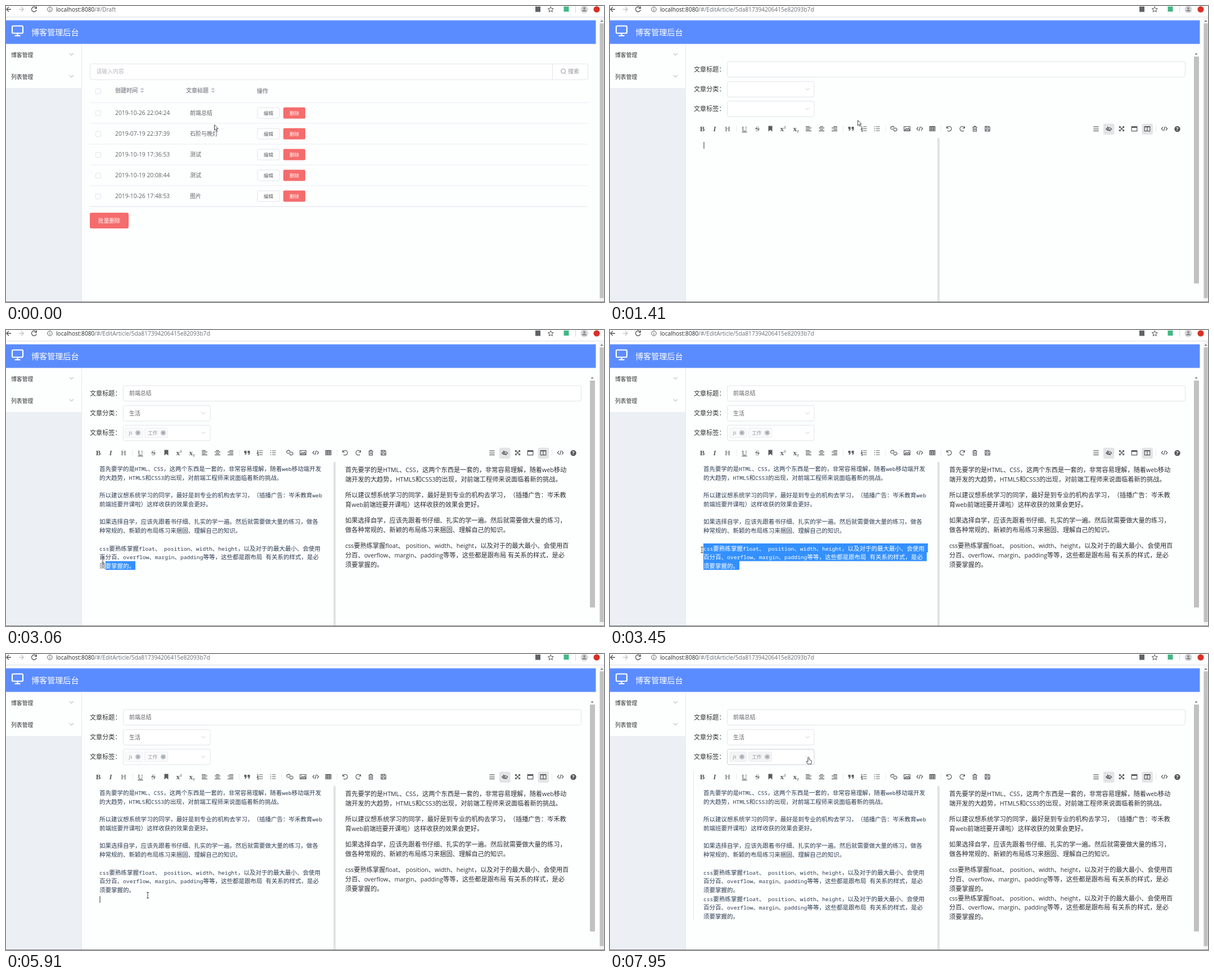
An HTML page for the animation above (8 s loop, 1063x527 px).

```html
<!DOCTYPE html>
<html lang="zh-CN">
<head>
<meta charset="utf-8">
<title>博客管理后台</title>
<style>
html, body { margin: 0; width: 100%; height: 100%; overflow: hidden; background: #fdfefe; }
svg { display: block; width: 100vw; height: 100vh; }
text { font-family: "Open Sans", "Noto Sans CJK SC", "Noto Sans CJK", sans-serif; white-space: pre; text-spacing-trim: space-all; }
.mono { font-family: "Noto Sans Mono", "Noto Sans CJK SC", "Noto Sans CJK", monospace; }
.bold { font-weight: 700; }
.serif { font-family: "Liberation Serif", serif; font-size: 13px; fill: #595b5f; text-anchor: middle; }
.line { fill: none; stroke: #595b5f; stroke-width: 1.2; }
.solid { fill: #595b5f; }
</style>
</head>
<body>
<script>
const LOOP = 8000;
const $ = id => document.getElementById(id);
const INK = '#606266', SOFT = '#909399', EDGE = '#e1e4ea', RED = '#f56c6c';

const rect = (x, y, w, h, fill, stroke = 'none', r = 0, more = '') =>
  `<rect x="${x}" y="${y}" width="${w}" height="${h}" rx="${r}" fill="${fill}" stroke="${stroke}" ${more}/>`;
const box = (x, y, w, h, more) => rect(x + .5, y + .5, w, h, '#fff', EDGE, 3, more);
const path = (d, stroke = INK, width = 1, fill = 'none') =>
  `<path d="${d}" stroke="${stroke}" stroke-width="${width}" fill="${fill}"/>`;
const circle = (x, y, r, fill, stroke = 'none') =>
  `<circle cx="${x}" cy="${y}" r="${r}" fill="${fill}" stroke="${stroke}"/>`;
const group = (id, body) => `<g id="${id}">${body}</g>`;

// Text centred on y; Latin runs get their own size beside the Chinese glyphs.
const LATIN = { mono: .917, prose: .945 };
const text = (x, y, size, str, fill = INK, cls = '', more = '') =>
  `<text x="${x}" y="${y + .37 * size}" font-size="${size}" fill="${fill}" class="${cls}" ${more}>` +
  str.replace(/[ -~]+/g, s => `<tspan font-size="${size * (LATIN[cls] || 1.03)}">${s}</tspan>`) + '</text>';
const chevron = (x, y, c) => path(`M${x - 3.5} ${y - 1.7}l3.5 3.4 3.5-3.4`, c, .9);

function chrome() {
  return rect(0, 0, 1063, 20, '#fff') + rect(0, 19, 1063, 1, '#dcdee0') +
    path('M9 6H.8M5 1.8L.8 6 5 10.2', '#4f5357', 1.3) +
    path('M23 6h8.2M27 1.8L31.2 6 27 10.2', '#c4c6c9', 1.3) +
    path('M53.4 3.2A4.4 4.4 0 1 0 54.2 7M54.3.8V4.3H50.8', '#4f5357', 1.3) +
    circle(78, 6, 4.2, 'none', '#55595d') + path('M78 5.4v3M78 3.4v1.1', '#55595d', 1.1) +
    `<text x="89" y="9.6" font-size="10.13" fill="#26292c">localhost:8080<tspan id="route" fill="#6b6f74"></tspan></text>` +
    rect(941, 1, 9, 9.5, '#5f6368') +
    path('M968.3 1.2l1.4 3.2 3.5.3-2.7 2.3.9 3.5-3.1-1.9-3.1 1.9.9-3.5-2.7-2.3 3.5-.3z', '#4f5357') +
    rect(991.5, 1, 9, 9, '#41b883') + rect(1012, 0, 1, 12, '#d8dadd') +
    circle(1028, 6, 6.6, '#d5d6d8') + circle(1028, 4, 2, '#85888c') +
    path('M1024 9.6q0-2.8 4-2.8t4 2.8z', 'none', 0, '#85888c') + circle(1050, 6, 5.6, '#d93025') +
    rect(0, 25.5, 1048.5, 42, '#5b8cff') +
    rect(11, 35.5, 19, 13, 'none', '#fff', 2, 'stroke-width="2.2"') + path('M20.5 49v4M15.5 53h10', '#fff', 2.2) +
    text(45, 46.5, 14.1, '博客管理后台', '#fff') +
    rect(0, 146, 134, 380, '#eceff4') + rect(134, 67.5, 1, 458.5, '#e6e7ea') +
    [['博客管理', 87], ['列表管理', 126]].map(([s, y]) => text(9, y, 9.85, s, '#303133') + chevron(116.3, y - 1, SOFT)).join('') +
    rect(1055, 21, 8, 505, '#f3f3f3') + rect(1055.5, 31, 7, 489, '#c1c1c1') + path('M1056.5 28h5l-2.5-3z', 'none', 0, '#777');
}

function draft() {
  const rows = [['2019-10-26 22:04:24', '前端总结'], ['2019-07-19 22:37:39', '石阶与晚灯'], ['2019-10-19 17:36:53', '测试'],
    ['2019-10-19 20:08:44', '测试'], ['2019-10-26 17:48:53', '图片']];
  const check = y => rect(159.5, y - 4.5, 9, 9, '#fff', EDGE, 1.5);
  const sort = x => path(`M${x - 3.5} 149h7l-3.5-3.8zM${x - 3.5} 151h7l-3.5 3.8z`, 'none', 0, '#c0c4cc');
  return box(149, 102.5, 885, 28) + rect(971, 103, 1, 27.5, EDGE) + text(160.5, 116.5, 9.85, '请输入内容', '#b4b7bf') +
    circle(990.5, 116, 3.9, 'none', SOFT) + path('M993.2 118.8l2.3 2.3', SOFT) + text(999, 116.5, 10, '搜索', SOFT) +
    check(152) + text(194, 150, 10, '创建时间', SOFT, 'bold') + sort(242) +
    text(320, 150, 10, '文章标题', SOFT, 'bold') + sort(368) + text(446, 151.5, 10, '操作', SOFT, 'bold') +
    rect(149, 172, 885, 37, '#f5f7fa', 'none', 0, 'id="rowHover"') + rect(149, 171.5, 885, 1, '#ebeef5') +
    rows.map(([date, title], i) => {
      const y = 190.5 + 37 * i, id = i ? '' : 'id="editBox"', label = i ? '' : 'id="editLabel"';
      return check(y + .5) + text(194, y, 10, date) + text(327, y, 10, title) +
        rect(447, y - 9.5, 39, 19, '#fff', EDGE, 2, id) + text(458, y, 8.5, '编辑', INK, '', label) +
        rect(493, y - 10, 39, 20, RED, 'none', 2) + text(504, y, 8.5, '删除', '#fff') +
        rect(149, y + 18, 885, 1, i < 4 ? '#ebeef5' : '#dfe2e8');
    }).join('') +
    rect(149, 368, 69, 28, RED, 'none', 3) + text(163.8, 382, 9.85, '批量删除', '#fff');
}

function toolbar() {
  const at = (x, cls, d) => `<path class="${cls}" transform="translate(${x} 218.5)" d="${d}"/>`;
  const letter = (x, s, more = '') => `<text class="serif" x="${x}" y="222.7" ${more}>${s}</text>`;
  const small = (x, dy) => letter(x, `x<tspan font-size="7" dy="${dy}">2</tspan>`, 'font-weight="700"');
  const bars = (...spans) => spans.map(([x, w], i) => `M${x} ${i * 2.6 - 3.9}h${w}`).join('');
  const code = 'M-2.5-3L-5.2 0-2.5 3M2.5-3L5.2 0 2.5 3M1-4L-1 4';
  const list = 'M-1.5-3.5h6.5M-1.5 0h6.5M-1.5 3.5h6.5';
  const undo = 'M-4.4-4.5v3.5h3.5M-4.2-1.2A4.2 4.2 0 1 1-3 3.2';
  const redo = 'M4.4-4.5v3.5H.9M4.2-1.2A4.2 4.2 0 1 0 3 3.2';
  const quote = 'M-5-3.5h4v4q0 3-3 3.2v-1.5q1.2-.2 1.2-1.7H-5zM1-3.5h4v4q0 3-3 3.2v-1.5q1.2-.2 1.2-1.7H1z';
  return letter(164, 'B', 'font-weight="700"') + letter(186, 'I', 'font-style="italic" font-weight="700"') + letter(209, 'H') +
    letter(239, 'U', 'text-decoration="underline"') + letter(262, 'S', 'text-decoration="line-through"') +
    at(285, 'solid', 'M-3.5-5h7V5L0 2-3.5 5z') + small(307.5, -4.5) + small(330.5, 2) +
    at(353, 'line', bars([-5, 7], [-5, 10], [-5, 7], [-5, 10])) +
    at(376, 'line', bars([-3, 6], [-5, 10], [-3, 6], [-5, 10])) +
    at(399, 'line', bars([-2, 7], [-5, 10], [-2, 7], [-5, 10])) +
    at(428.5, 'solid', quote) +
    at(451.5, 'line', list + 'M-4-5v3M-5-.8h2L-5 1.2h2M-5 2.5h2v2.5h-2') +
    at(474.5, 'line', list + 'M-5-3.5h2M-5 0h2M-5 3.5h2') +
    at(504.5, 'line', 'M-.2-.2L-2.2 1A2.2 2.2 0 0 1-4-3.6L-2-4.3Q.3-4 .4-1.6M.2.2L2.2-1A2.2 2.2 0 0 1 4 3.6L2 4.3Q-.3 4-.4 1.6') +
    at(528, 'line', 'M-5.3-4H5.3V4H-5.3zM-4 2.5l2.5-3 1.8 1.6L2.5-1.5 4.3 2.5zM-3-2.2h1') +
    at(550.5, 'line', code) +
    at(573, 'line', 'M-4.7-4H4.7V4H-4.7zM-4.7-3H4.7M-4.7-.6H4.7M-4.7 1.8H4.7M-1.6-4V4M1.6-4V4') +
    at(603, 'line', undo) + at(626, 'line', redo) +
    at(648.5, 'line', 'M-4-3H4M-1.3-3v-1.3h2.6V-3M-3-3V4.3H3V-3M-1-1v3.6M1-1v3.6') +
    at(671, 'line', 'M-4.2-4.2H2.6L4.2-2.6V4.2H-4.2zM-2.2-4v2.6h4V-4M-2.4 4V1h4.8v3') +
    [224.5, 414, 489.5, 588, 970].map(x => rect(x, 213, 1, 11, '#e9e9eb')).join('') +
    [877, 945.5].map(x => rect(x, 209.5, 19.5, 19.5, '#e3e4e5', 'none', 3)).join('') +
    at(864, 'line', 'M-4.7-3.3H4.7M-4.7.3H4.7M-4.7 3.9H4.7') +
    at(886.7, 'line', 'M-5 .5Q0-5 5 .5 0 6-5 .5zM-1.6-.5A1.8 1.8 0 0 0 .8 2.2M-2.6-3.6L2.6 4.4') +
    at(909.5, 'line', 'M-4-1.3V-4h2.7M4-1.3V-4H1.3M-4 1.3V4h2.7M4 1.3V4H1.3M-4-4L4 4M4-4L-4 4') +
    at(932, 'line', 'M-4.8-4H4.8V4.2H-4.8zM-4.8-3H4.8M-4.8-2.2H4.8') +
    at(955, 'line', 'M-4.8-4H4.8V4.2H-4.8zM-4.8-3.2H4.8M0-4V4') +
    at(985.5, 'line', code) + circle(1008.5, 219, 5.2, '#55575b') +
    '<text x="1008.5" y="222.4" font-size="9" font-weight="700" fill="#fff" text-anchor="middle">?</text>';
}

const CODE = ['首先要学的是HTML、CSS，这两个东西是一套的，非常容易理解，随着web移动端开发', '的大趋势，HTML5和CSS3的出现，对前端工程师来说面临着新的挑战。', '',
  '所以建议想系统学习的同学，最好是到专业的机构去学习，（插播广告：岑禾教育web', '前端班要开课啦）这样收获的效果会更好。', '',
  '如果选择自学，应该先跟着书仔细、扎实的学一遍。然后就需要做大量的练习，做各', '种常规的、新颖的布局练习来捆固、理解自己的知识。', ''];
const LAST = ['css要熟练掌握float、 position、width、height，以及对于的最大最小、会使用',
  '百分百、overflow、margin、padding等等，这些都是跟布局 有关系的样式，是必', '须要掌握的。'];
const PROSE = [['首先要学的是HTML、CSS，这两个东西是一套的，非常容易理解，随着web移动', '端开发的大趋势，HTML5和CSS3的出现，对前端工程师来说面临着新的挑战。'],
  ['所以建议想系统学习的同学，最好是到专业的机构去学习，（插播广告：岑禾教', '育web前端班要开课啦）这样收获的效果会更好。'],
  ['如果选择自学，应该先跟着书仔细、扎实的学一遍。然后就需要做大量的练习，', '做各种常规的、新颖的布局练习来捆固、理解自己的知识。']];
const LAST_PROSE = [LAST[0] + '百', LAST[1].slice(1), LAST[2]];

const codeLines = (lines, y, fill = '#2f3e52') => lines.map((s, i) => text(166, y + 15.7 * i, 10.52, s, fill, 'mono')).join('');
const proseLines = (lines, y) => lines.map((s, i) => text(603, y + 16.8 * i, 11.23, s, '#2c2f34', 'prose')).join('');

function editor() {
  const tag = (x, w, s) => rect(x + .5, 174.5, w, 17, '#fafafb', '#eceef1', 2, 'class="tag"') + text(x + 6.3, 183, 8.5, s, SOFT) +
    circle(x + w - 7.5, 183, 4.6, '#c0c4cc') + path(`M${x + w - 9.2} 181.3l3.4 3.4m0-3.4l-3.4 3.4`, '#777', .8);
  return [['文章标题：', 112.5], ['文章分类：', 147.5], ['文章标签：', 182.5]].map(([s, y]) => text(149, y, 11.1, s, '#303133')).join('') +
    box(208, 98.5, 814, 27.5) + box(208, 134, 154.5, 27.5) + box(208, 169, 154.5, 27.5, 'id="tagBox"') +
    chevron(351, 148, '#c0c4cc') + chevron(351, 183, '#c0c4cc') + toolbar() +
    rect(148, 207, 1, 267, '#e4e6ea', 'none', 0, 'id="panelEdge"') +
    rect(582, 235, 4, 291, '#e1e2e4') + rect(1038, 90, 9, 404, '#c1c1c1') + path('M1039.5 86.5h5l-2.5-3z', 'none', 0, '#777') +
    group('content', text(219, 112.5, 9.9, '前端总结') + text(219, 148, 9.9, '生活') + tag(212, 30, 'js') + tag(246, 41, '工作') +
      codeLines(CODE, 247.4) + codeLines(LAST, 388.7) +
      '<path id="selection" fill="#3390ff"/><clipPath id="clip"><path id="clipShape"/></clipPath>' +
      `<g clip-path="url(#clip)">${codeLines(LAST, 388.7, '#fff')}</g>` +
      PROSE.map((p, i) => proseLines(p, 249.1 + 45 * i)).join('') + proseLines(LAST_PROSE, 384)) +
    group('pasted', codeLines(LAST, 435.8) + proseLines(LAST_PROSE, 434.4)) +
    '<path id="caret" d="M0-6V6" stroke="#333"/>';
}

document.body.innerHTML = `<svg viewBox="0 0 1063 527" preserveAspectRatio="none">${rect(0, 0, 1063, 527, '#fdfefe')}${chrome()}` +
  `${group('draft', draft())}${group('editor', editor())}${rect(0, 526, 1063, 1, '#85878a')}` +
  '<path id="pointer" stroke-width=".9" stroke="#333" fill="#fff"/></svg>';

const SHAPES = {
  arrow: 'M.5 .5V10L2.6 8 4 11.2 5.5 10.5 4.1 7.4H7z',
  beam: 'M-2-5H2M-2 5H2M0-5V5',
  hand: 'M-1.2 1Q0-.6 1.2 1V4.6L4.6 5.3Q5.6 5.7 5.4 7L4.6 12H-1.2L-3.8 8Q-4.2 6.6-2.8 6.8L-1.2 8z'
};
// time, x, y, optional new shape
const MOVES = [[0, 370, 211, 'arrow'], [120, 392, 213], [240, 418, 214], [360, 439, 212], [510, 447, 205],
  [630, 456, 198, 'hand'], [750, 463, 195], [870, 461, 192], [1020, 459, 191], [1140, 458.5, 190.5], [1290, 440, 203, 'arrow'],
  [1560, 379.5, 245.5, 'beam'], [1680, 310.5, 261.5], [1980, 303.5, 317.5], [2130, 318.5, 386], [2280, 278.5, 417.5],
  [2430, 255, 425], [2550, 232, 424], [2670, 212, 421], [2790, 192, 418], [2910, 178, 417], [3060, 172, 409], [3180, 166, 400],
  [3300, 163.5, 391.5], [3730, 163.5, 390.5], [4410, 190, 402], [4560, 208, 424], [4840, 230, 433], [4960, 252, 429.5],
  [6870, 130, 119, 'arrow'], [7020, 100, 61], [7140, 126, 73], [7290, 208, 132], [7410, 291, 190],
  [7560, 316, 198], [7680, 338, 197], [7800, 355, 190, 'hand'], [7950, 353, 184]];
// time, first selected row, x there
const SELECTIONS = [[0], [2550, 2, 218.6], [2670, 2, 208], [2790, 2, 187], [2910, 2, 176.8], [3180, 1, 166], [3300, 0, 166], [5230]];
const CARETS = [[0], [1290, 167, 248], [1560, 229.5, 421], [2130], [5230, 229.5, 421], [5910, 167, 437],
  [6310, 229.5, 468], [6870], [7290, 229.5, 468], [7950]];
let shape;
for (const m of MOVES) shape = m[3] = m[3] || shape;

const latest = (list, t) => list.findLast(e => e[0] <= t);
const show = (id, on) => $(id).style.display = on ? '' : 'none';
const set = (el, name, value) => el.setAttribute(name, value);

function selectionPath(row, left) {
  const tops = [380, 396, 411.5, 427];
  return row === undefined ? '' : [565, 563, 230].map((end, i) => {
    const x = i === row ? left : 166;
    return i < row ? '' : `M${x} ${tops[i]}H${end}V${tops[i + 1]}H${x}z`;
  }).join('');
}

function draw(t) {
  const editing = t >= 1290, hover = t >= 630, tagHover = t >= 7410;
  show('draft', !editing);
  show('editor', editing);
  show('content', t >= 1560);
  show('pasted', t >= 6310);
  show('panelEdge', t >= 6870);
  show('rowHover', t >= 510);
  $('route').textContent = editing ? '/#/EditArticle/5da817394206415e82093b7d' : '/#/Draft';
  set($('editBox'), 'fill', hover ? '#ecf5ff' : '#fff');
  set($('editBox'), 'stroke', hover ? '#409eff' : EDGE);
  set($('editLabel'), 'fill', hover ? '#409eff' : INK);
  set($('tagBox'), 'stroke', tagHover ? '#cdd0d7' : EDGE);
  document.querySelectorAll('.tag').forEach(el => set(el, 'fill', tagHover ? '#f4f4f5' : '#fafafb'));

  const [, row, left] = latest(SELECTIONS, t);
  for (const id of ['selection', 'clipShape']) set($(id), 'd', selectionPath(row, left));
  const [, cx, cy] = latest(CARETS, t);
  show('caret', cx);
  if (cx) set($('caret'), 'transform', `translate(${cx} ${cy})`);
  const [, x, y, kind] = latest(MOVES, t);
  set($('pointer'), 'd', SHAPES[kind]);
  set($('pointer'), 'transform', `translate(${x} ${y})`);
}

const start = performance.now();
function tick() {
  draw((performance.now() - start) % LOOP);
  requestAnimationFrame(tick);
}
tick();
</script>
</body>
</html>
```
